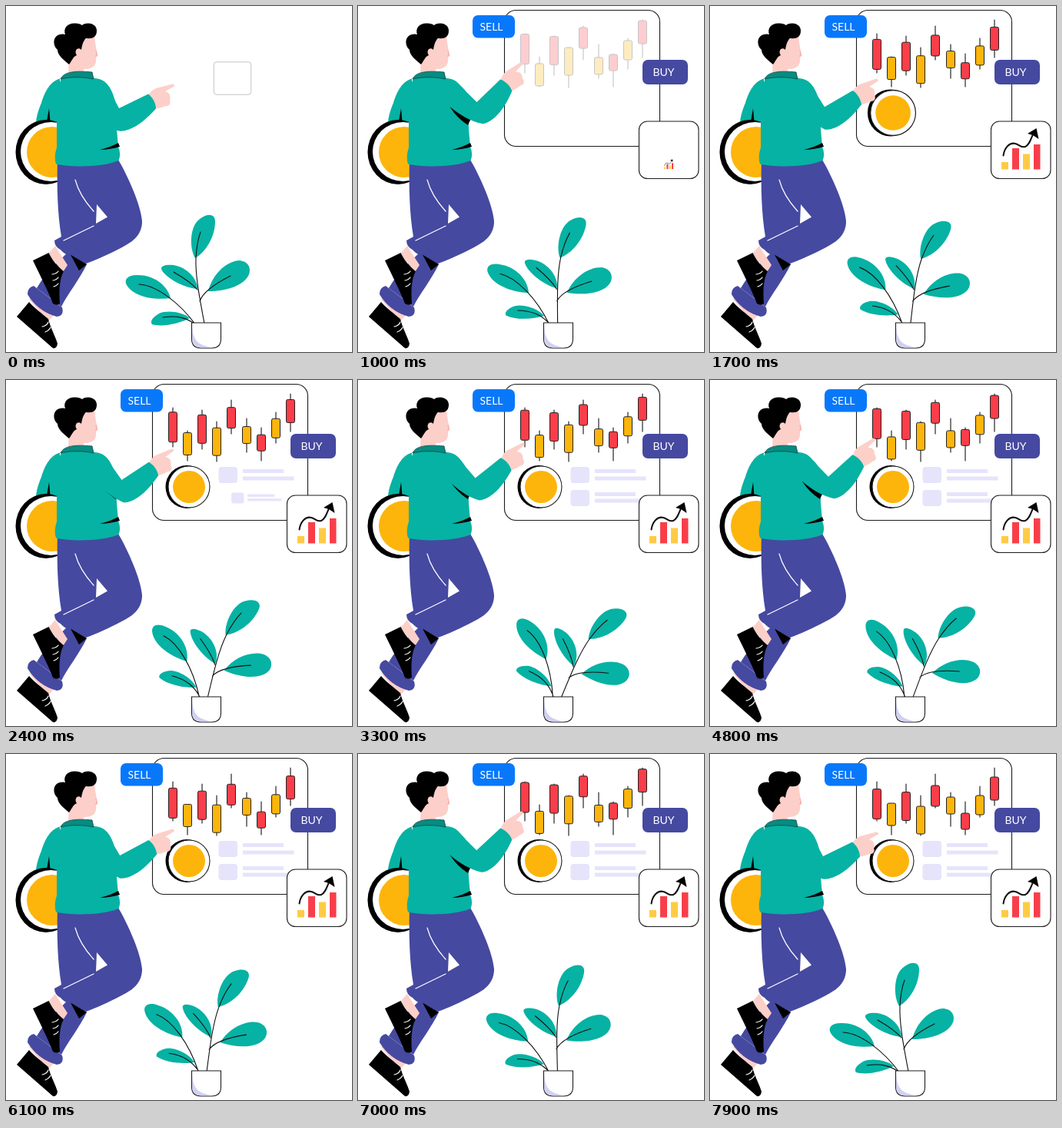
These frames come from a looping animation (450 by 450 pixels, 8 s). An HTML page:

```html
<!DOCTYPE html>
<html lang="en">
<head>
<meta charset="utf-8">
<title>Trading desk</title>
<style>
  html, body { margin: 0; width: 100%; height: 100%; overflow: hidden; background: #fff; }
  svg { display: block; width: 100%; height: 100%; }
  text { font-family: Lato, "Noto Sans", sans-serif; font-size: 14px; fill: #fff; }
  .teal { fill: #06b2a3; }
  .skin { fill: #fdcfc9; }
  .pants { fill: #4549a0; }
  .gold { fill: #fdb50c; }
  .red { fill: #f93e49; }
  .pale { fill: #e6e4fb; }
  .box { fill: #fff; stroke: #1c1c1c; stroke-width: 1.1; }
  .line { fill: none; stroke: #111; stroke-width: 1.1; stroke-linecap: round; }
  .trend { stroke-width: 2; }
  .seam { fill: none; stroke: #fff; stroke-width: 1.2; stroke-linecap: round; }
</style>
</head>
<body>
<svg viewBox="0 0 450 450">
  <g id="panel"><rect class="box" x="190.5" y="5.5" width="202" height="177" rx="15"/></g>
  <g id="candles"></g>
  <g id="coin">
    <ellipse cx="235" cy="139" rx="27.5" ry="28"/>
    <circle class="box" cx="238" cy="139" r="27"/>
    <circle class="gold" cx="238" cy="139" r="21"/>
  </g>
  <g id="row1" class="pale">
    <rect x="276.5" y="113" width="24.5" height="21" rx="4"/>
    <rect x="308" y="116" width="53" height="5"/>
    <rect x="308" y="125.5" width="66.5" height="5"/>
  </g>
  <g id="row2" class="pale">
    <rect x="276.5" y="143" width="24.5" height="21" rx="4"/>
    <rect x="308" y="146" width="53" height="5"/>
    <rect x="308" y="154.5" width="66.5" height="5"/>
  </g>
  <g id="sell">
    <rect x="149" y="12" width="55" height="29.5" rx="7" fill="#0878fb"/>
    <text x="158.5" y="31.7">SELL</text>
  </g>
  <g id="buy">
    <rect class="pants" x="370" y="70" width="59" height="32" rx="7"/>
    <text x="383.5" y="91.3">BUY</text>
  </g>
  <g id="card"><rect class="box" x="365.5" y="150" width="77.5" height="74.5" rx="11"/></g>
  <g id="chart">
    <path fill="#ffcb45" d="M379 203h9v9.500h-9zM407 192.500h9v20h-9z"/>
    <path class="red" d="M393 185h9v27.500h-9zM421 180h8.500v32.500h-8.500z"/>
    <path class="line trend" d="M381.500 194.500C383 184 390 177 397 179C402 180 405 185 410 183C415 181 417 174 420 167"/>
    <path d="M413 166L424.500 159L427.500 173L420 168Z"/>
  </g>

  <!-- plant -->
  <g id="plant">
    <g class="teal">
      <path d="M246 328C238 314 239 286 252 277C262 269 272 270 272 280C272 300 260 320 246 328Z"/>
      <path d="M263 371C268 350 285 333 302 331C315 331 319 341 316 349C310 364 285 371 263 371Z"/>
      <path d="M249 368C249 355 236 340 218 337C208 336 201 338 202 342C206 352 228 366 249 368Z"/>
      <path d="M214 380C210 362 190 349 170 350C158 350 153 356 157 363C166 378 192 383 214 380Z"/>
      <path d="M239 406C230 398 210 395 199 400C190 405 187 411 190 414C204 418 225 413 239 406Z"/>
    </g>
    <path class="line" d="M260 424C254 390 246 355 247 328Q248 308 253 294M252 384C256 372 270 362 292 351M218 346C232 354 243 362 249 369M173 362C195 363 225 385 247 415L255 424M204 405C222 402 236 405 250 417"/>
  </g>
  <path class="box" d="M241.500 412H279.500V433Q279.500 445 267 445H254Q241.500 445 241.500 433Z"/>
  <path fill="#cfd0f3" d="M242.200 418C244 438 252 441 268 444.300H254Q242.200 444 242.200 433Z"/>

  <!-- far arm and carried coin -->
  <path class="teal" d="M72 94C58 97 51 110 46 126C41 138 39 147 39 153L70 158V95Z"/>
  <path d="M56 133L53 150L58 156Z"/>
  <ellipse cx="52" cy="190" rx="39.5" ry="42"/>
  <ellipse cx="58.5" cy="189.5" rx="39.5" ry="38.5" fill="#fff"/>
  <circle class="gold" cx="60" cy="190" r="33"/>

  <!-- legs -->
  <path class="skin" d="M30 381L39 376L66 398L54 411Z"/>
  <path d="M30 385C38 394 47 400 55 407C58 419 64 429 67 439Q66 446 61 445L14 404Z"/>
  <path class="pants" d="M85 316L105 336C96 355 80 375 72 391L40 367C50 349 65 335 85 316Z"/>
  <path class="pants" d="M36 364L73 392Q76 403 66 404Q41 397 28 375Q28 366 36 364Z"/>
  <path class="skin" d="M55 322L64 312L80 337L74 346Z"/>
  <path d="M35 331L55.500 321C60 330 66 338 75 345C69 356 69 372 70 387Q66 390 61 387C55 371 45 352 35 331Z"/>
  <path class="pants" d="M67 200H146C158 220 176 260 177 280C177 296 167 305 156 311C138 321 120 329 104 335L82 325Q74 321 71 317Q63 313 63 305L72 300C67 270 66 235 67 200Z"/>
  <path d="M84 323.500L105 336L95 344Z"/>
  <path fill="#fff" d="M118 258L132 274.500L117 283Z"/>
  <path class="seam" d="M90 226C94 241 104 256 114 267M75 305L114 286"/>
  <path class="seam" d="M60 349Q66 348 68 345M61 357Q66 356 68 353M62 365Q66 364 68 361M47 417Q53 416 55 411M51 424Q56 422 58 418"/>

  <!-- head -->
  <path class="skin" d="M82 60L100 45L115 39C116 48 117 54 119 63Q119 66 117 66C118 76 115 82 101 82V90H81Z"/>
  <path d="M82 76C75 70 67 64 67 57C60 51 61 39 70 37Q74 36 77 37C74 29 80 22 90 22.500Q96 22.500 99 25C106 20 118 23 118 32C118 41 112 43 104 42C100 46 99 51 98 57Q96 54 92 56Q89 60 92 64C87 66 86 71 82 76Z"/>
  <path fill="none" stroke="#f29a93" stroke-width=".8" d="M117 58L118.500 65H116"/>

  <!-- sweater -->
  <path class="teal" d="M72 94C80 91 106 90 115 94C130 94 139 108 143 128L144 160L146 183Q150 193 146.500 201C125 210 85 210 65 205.500Q62 196 66 184V110Z"/>
  <path fill="#078b81" stroke="#0c4742" stroke-width=".8" d="M71 95C75 85 92 84 112 86L114 95C100 92 84 92 71 95Z"/>
  <path d="M122 187Q135 184 146 178L148 183Q134 187 122 187Z"/>
  <path d="M120 132Q129 146 143 155L147 146L124 130Z"/>
  <g id="arm">
    <path class="skin" d="M184 118C188 110 193 107 199 106L216 101.500C220 101.500 220 104.500 217 105.500L207 111C214 113 214 118 213 122C215 127 212 131 207 130C202 133 199 132 193 134Z"/>
    <path class="teal" d="M113 95C127 94 134 105 138 116L147 133L185 114.500C190 118 195 126 195 133.500C184 146 172 156 160 160.500Q150 164 145 162C131 154 121 142 113 130Z"/>
  </g>
</svg>
<script>
const LOOP = 8000, CYCLE = 7900;
const $ = id => document.getElementById(id);

// x, wick top, wick bottom, body top, body height, travel, colour
const candles = [
  [217, 36, 87, 45.5, 39, -9, "red"],
  [236, 66, 105, 64, 29, 11, "gold"],
  [255, 39, 90, 49.5, 37, -10, "red"],
  [274, 54, 106, 68, 36, -14, "gold"],
  [293, 26, 70, 41, 27, -13, "red"],
  [313, 50, 94, 56, 22, 11, "gold"],
  [332, 62, 105, 77, 21, -14, "red"],
  [351, 42, 82, 54, 25, -9, "gold"],
  [370, 18, 67, 30, 30, -11, "red"]
];
$("candles").innerHTML = candles.map(([x, top, end, y, h, , color]) =>
  `<path class="line" d="M${x} ${top}V${end}"/>
   <rect class="${color}" x="${x - 5.5}" y="${y}" width="11" height="${h}" rx="2" stroke="#222"/>`).join("");
const bodies = [...$("candles").querySelectorAll("rect")];

// id, centre x, centre y, start, duration
const pops = [
  ["panel", 295.5, 94, -33, 600],
  ["sell", 176.5, 26.5, 300, 600],
  ["buy", 399.5, 86, 350, 600],
  ["card", 404, 187.5, 400, 600],
  ["chart", 404, 212, 967, 600],
  ["coin", 237, 139, 1400, 600],
  ["row1", 326, 123, 1780, 600],
  ["row2", 326, 153.5, 2290, 600]
];

const clamp = v => Math.min(1, Math.max(0, v));
const backOut = p => p <= 0 ? 0 : 1 + 2.7 * (p - 1) ** 3 + 1.7 * (p - 1) ** 2;
const swing = (t, period) => 1 - Math.abs(1 - 2 * (t / period % 1));
const soften = s => (s + s * s * (3 - 2 * s)) / 2;

function draw(t) {
  for (const [id, x, y, start, time] of pops) {
    const s = backOut(clamp((t - start) / time));
    $(id).setAttribute("transform", `translate(${x} ${y}) scale(${s}) translate(${-x} ${-y})`);
  }
  const m = Math.min(t, CYCLE);
  const k = soften(swing(m, CYCLE / 4));
  const u = swing(m, CYCLE);
  $("candles").setAttribute("opacity", clamp((t - 900) / 400));
  bodies.forEach((b, i) => b.setAttribute("y", candles[i][3] + candles[i][5] * k));
  $("arm").setAttribute("transform", `rotate(${-18 * k} 125 105)`);
  $("plant").setAttribute("transform", `translate(0 ${3 * u}) rotate(${39.5 * u} 262 422)`);
}

let begin;
function tick(now) {
  begin ??= now;
  draw((now - begin) % LOOP);
  requestAnimationFrame(tick);
}
draw(0);
requestAnimationFrame(tick);
</script>
</body>
</html>
```
